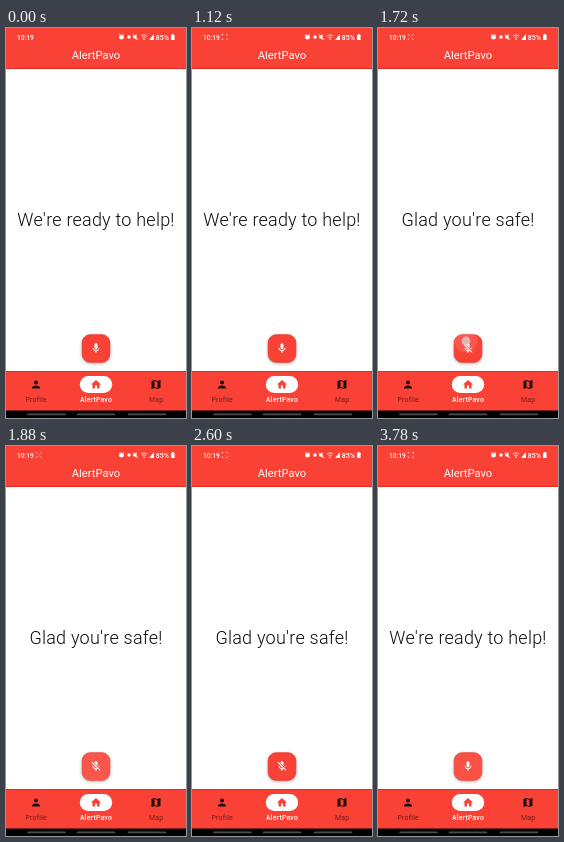
An HTML page that plays this animation: 180 by 390 pixels, repeating every 3800 ms.

```html
<!DOCTYPE html>
<html lang="en">
<head>
<meta charset="utf-8">
<style>
  html, body { margin: 0; width: 100%; height: 100%; overflow: hidden; background: #fff; }
  svg { display: block; width: 100%; height: 100%; font-family: Roboto, sans-serif; }
  .bar { fill: #f94135; }
  .edge { fill: #e92a1e; }
  .line { fill: none; stroke: #fff; stroke-width: .8; }
  .label { font-size: 6.9px; letter-spacing: .2px; text-anchor: middle; }
  #button { stroke: #ee2f23; stroke-width: .7; filter: drop-shadow(0 1.8px 1.6px rgba(0, 0, 0, .32)); }
</style>
</head>
<body>
<svg viewBox="0 0 180 390">
  <defs>
    <clipPath id="buttonClip"><rect x="76" y="306.5" width="28" height="28" rx="8"/></clipPath>
  </defs>
  <rect width="180" height="390" fill="#fff"/>

  <!-- status and title bars -->
  <rect class="bar" width="180" height="41"/>
  <rect class="edge" y="40" width="180" height="1"/>
  <g fill="#fff">
    <text x="11" y="11.6" font-size="6.6" font-weight="500">10:19</text>
    <path id="corners" class="line"/>
    <path class="line" d="M113 7.2l1.4-1.2M118 7.2l-1.4-1.2"/>
    <circle cx="115.5" cy="9.2" r="2.4"/>
    <circle cx="123" cy="9" r="1.7"/>
    <path d="M127 7.8h1.5l2-1.8v6l-2-1.8H127z"/>
    <path class="line" d="M127 6.3l5 5.4"/>
    <path class="line" d="M135 8q3-2.6 6 0M136.3 9.7q1.7-1.4 3.4 0"/>
    <circle cx="138" cy="11.2" r=".8"/>
    <path d="M143 12L148 6V12z"/>
    <text x="149.7" y="11.6" font-size="7" font-weight="500">85%</text>
    <path d="M165 6.8h1V6h1.6v.8h1V12H165z"/>
    <text x="90" y="31" font-size="11.2" text-anchor="middle">AlertPavo</text>
  </g>

  <text id="message" x="90" y="198" font-size="18" font-weight="300" letter-spacing=".22" text-anchor="middle" fill="#0c0c0c"></text>

  <!-- microphone button -->
  <rect id="button" class="bar" x="76.2" y="306.7" width="27.6" height="27.6" rx="8"/>
  <circle id="ripple" fill="#fff" clip-path="url(#buttonClip)"/>
  <path id="mic" fill="#fff" transform="translate(84 314.3) scale(.5)"/>
  <circle id="touch" r="4.4" fill="#d9d2d2" fill-opacity=".76"/>

  <!-- navigation -->
  <rect class="bar" y="343" width="180" height="40"/>
  <rect class="edge" y="343" width="180" height="1"/>
  <rect x="73.8" y="348" width="32.4" height="17" rx="8.5" fill="#fff"/>
  <g fill="#20100f">
    <path transform="translate(24 350.5) scale(.5)" d="M12 12c2.21 0 4-1.79 4-4s-1.79-4-4-4-4 1.79-4 4 1.79 4 4 4zm0 2c-2.67 0-8 1.34-8 4v2h16v-2c0-2.66-5.33-4-8-4z"/>
    <path transform="translate(144 350.5) scale(.5)" d="M20.5 3l-.16.03L15 5.1 9 3 3.36 4.9c-.21.07-.36.25-.36.48V20.5c0 .28.22.5.5.5l.16-.03L9 18.9l6 2.1 5.64-1.9c.21-.07.36-.25.36-.48V3.5c0-.28-.22-.5-.5-.5zM15 19l-6-2.11V5l6 2.11V19z"/>
  </g>
  <path class="bar" transform="translate(84 350.5) scale(.5)" d="M10 20v-6h4v6h5v-8h3L12 3 2 12h3v8z"/>
  <g class="label" fill="#6d1f19">
    <text x="30.2" y="374">Profile</text>
    <text x="90" y="374" fill="#fff" font-weight="500">AlertPavo</text>
    <text x="150.2" y="374">Map</text>
  </g>
  <rect y="382.5" width="180" height="7.5"/>
  <path d="M22 386.3h37M71.5 386.3h37M122.5 386.3h37" stroke="#4c4c4c" stroke-width="1.8" stroke-linecap="round"/>
</svg>
<script>
  const LOOP = 3800;
  const MIC = "M12 14c1.66 0 2.99-1.34 2.99-3L15 5c0-1.66-1.34-3-3-3S9 3.34 9 5v6c0 1.66 1.34 3 3 3zm5.3-3c0 3-2.54 5.1-5.3 5.1S6.7 14 6.7 11H5c0 3.41 2.72 6.23 6 6.72V21h2v-3.28c3.28-.48 6-3.3 6-6.72h-1.7z";
  const MIC_OFF = "M19 11h-1.7c0 .74-.16 1.43-.43 2.05l1.23 1.23c.56-.98.9-2.09.9-3.28zm-4.02.17c0-.06.02-.11.02-.17V5c0-1.66-1.34-3-3-3S9 3.34 9 5v.18l5.98 5.99zM4.27 3L3 4.27l6.01 6.01V11c0 1.66 1.33 3 2.99 3 .22 0 .44-.03.65-.08l1.66 1.66c-.71.33-1.5.52-2.31.52-2.76 0-5.3-2.1-5.3-5.1H5c0 3.41 2.72 6.23 6 6.72V21h2v-3.28c.91-.13 1.77-.45 2.54-.9L19.73 21 21 19.73 4.27 3z";
  const taps = [
    { down: 1560, act: 1660, up: 1840, x: 88, y: 313 },
    { down: 3380, act: 3520, up: 3660, x: 82, y: 318 }
  ];
  const $ = id => document.getElementById(id);
  const set = (id, attrs) => {
    for (const name in attrs) $(id).setAttribute(name, attrs[name]);
  };
  const ramp = (t, from, to) => {
    const p = Math.min(1, Math.max(0, (t - from) / (to - from)));
    return p * p * (3 - 2 * p);
  };

  // Four brackets that move inward until they meet as a cross.
  function cornerPath(open) {
    const far = 1 + 1.6 * open, arm = 1.9 - .7 * open;
    let d = "";
    for (const sx of [-1, 1]) for (const sy of [-1, 1]) {
      const x = 32.7 + sx * far, y = 9 + sy * far;
      const inX = x - sx * arm * open, inY = y - sy * arm * open;
      const outX = x + sx * arm * (1 - open), outY = y + sy * arm * (1 - open);
      d += `M${inX} ${y}L${x} ${y}L${x} ${inY}M${x} ${y}L${outX} ${outY}`;
    }
    return d;
  }

  function draw(t) {
    const safe = t >= taps[0].act && t < taps[1].act;
    $("message").textContent = safe ? "Glad you're safe!" : "We're ready to help!";
    set("mic", { d: safe ? MIC_OFF : MIC });

    const open = ramp(t, 480, 660) - ramp(t, 1320, 1500) + ramp(t, 1860, 2060)
      - ramp(t, 3160, 3340) + ramp(t, 3600, 3760);
    set("corners", { d: cornerPath(open), opacity: .8 * ramp(t, 460, 560) });

    const tap = t < 2600 ? taps[0] : taps[1];
    const pressed = t >= tap.down && t < tap.up;
    set("touch", { cx: tap.x, cy: tap.y, opacity: pressed ? 1 : 0 });
    set("ripple", {
      cx: tap.x, cy: tap.y,
      r: 32 * ramp(t, tap.down, tap.down + 400),
      opacity: .12 * (1 - ramp(t, tap.up, tap.up + 300))
    });
  }

  function frame() {
    draw(performance.now() % LOOP);
    requestAnimationFrame(frame);
  }
  frame();
</script>
</body>
</html>
```
